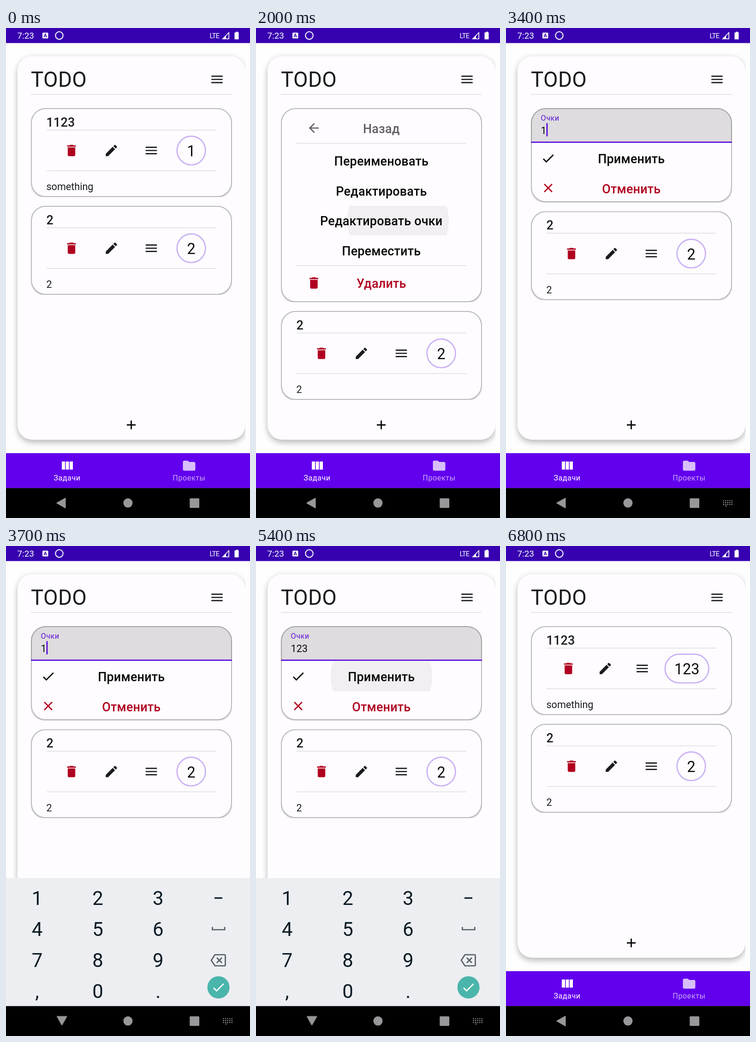
These frames come from a looping animation (529 by 1058 pixels, 6900 ms). An HTML page:

```html
<!DOCTYPE html>
<html lang="ru">
<head>
<meta charset="utf-8">
<title>TODO</title>
<style>
@property --h { syntax: "<length>"; inherits: true; initial-value: 192.2px; }

html, body { margin: 0; width: 100%; height: 100%; overflow: hidden; background: #fefefe; }
#stage { position: absolute; left: 0; top: 0; width: 529px; height: 1058px; overflow: hidden; }
#stage * { animation-play-state: paused !important; }
#stage div, svg { position: absolute; }
svg { left: 0; top: 0; width: 529px; height: 1058px; font-family: Roboto, "Noto Sans", sans-serif; fill: #1b1a1d; }

/* panel */
#sheet { left: 9px; top: 40px; width: 509.5px; height: 878px; overflow: hidden; }
#sheet div {
  left: 16px; top: 21px; width: 493.5px; height: 828px; border-radius: 32px; background: #fefcfe;
  box-shadow: 0 7px 13px rgba(0,0,0,.22), 0 0 14px rgba(0,0,0,.08);
}

/* cards */
#cards {
  left: 54px; top: 173.3px; width: 436px;
  animation: grow .4s 880ms forwards, shrink .4s 2180ms forwards, settle .4s 5700ms forwards;
  animation-timing-function: cubic-bezier(.17,.55,.3,1);
}
.card { width: 436px; height: 192.2px; overflow: hidden; }
.card svg { left: -54px; top: -173.3px; }
.frame {
  box-sizing: border-box; width: 436px; height: 191.4px; border: 2.7px solid #b9b8ba;
  border-radius: 32px; background: #fefcfe; box-shadow: 0 1.5px 2.5px rgba(0,0,0,.22);
}
#first { height: var(--h); }
#first .frame { animation: tall 1ms 880ms forwards, mid 1ms 2580ms forwards, low 1ms 5880ms forwards; }
#second { transform: translateY(calc(var(--h) + 18.8px)); }
@keyframes grow { to { --h: 419.2px; } }
@keyframes shrink { to { --h: 203.7px; } }
@keyframes settle { to { --h: 192.2px; } }
@keyframes tall { to { height: 418.6px; } }
@keyframes mid { to { height: 203px; } }
@keyframes low { to { height: 191.4px; } }

/* panes */
.pane { animation-timing-function: cubic-bezier(.4,0,.2,1); }
#view { animation: to-left .4s 880ms forwards; }
#menu { animation: from-right .4s 880ms both, to-left .4s 2180ms forwards; }
#edit { animation: from-right .4s 2180ms both, to-right .4s 5480ms forwards; }
#done { animation: from-left .4s 5480ms both; }
#view, #menu, #edit, #done { animation-timing-function: cubic-bezier(.4,0,.2,1); }
@keyframes from-right { from { transform: translateX(436px); } }
@keyframes from-left { from { transform: translateX(-436px); } }
@keyframes to-left { to { transform: translateX(-436px); } }
@keyframes to-right { to { transform: translateX(436px); } }

/* touch feedback */
.ripple {
  fill: #000; fill-opacity: .05; visibility: hidden;
  animation: show 1ms var(--at) forwards, spread .3s linear var(--at) both,
    fade .2s calc(var(--at) + 300ms) forwards;
}
@keyframes spread { from { r: calc(var(--r) * .25); } to { r: var(--r); } }
@keyframes fade { to { opacity: 0; } }
@keyframes show { to { visibility: visible; } }
@keyframes hide { to { visibility: hidden; } }

/* points field */
#field { color: #77757a; stroke-width: 1.4px; animation: focus 1ms 3300ms forwards; }
@keyframes focus { to { color: #6013d8; stroke-width: 2.7px; } }
.two, .three, #caret, #ime { visibility: hidden; }
.two { animation: show 1ms 4200ms forwards; }
.three { animation: show 1ms 4500ms forwards; }
#caret {
  animation: show 1ms 3300ms forwards, hide 1ms 3800ms forwards, show 1ms 4200ms forwards,
    hide 1ms 5000ms forwards, show 1ms 5500ms forwards;
}
#caret path { animation: step1 1ms 4200ms forwards, step2 1ms 4500ms forwards; }
@keyframes step1 { to { transform: translateX(12.1px); } }
@keyframes step2 { to { transform: translateX(24.2px); } }

/* keyboard and system bar */
#ime { animation: show 1ms 3300ms forwards, hide 1ms 5800ms forwards; }
#back {
  transform-origin: 120px 1024.5px;
  animation: turn .2s 3500ms forwards, unturn .16s 5800ms forwards;
}
#keys { animation: rise .2s linear 3500ms both, sink .175s linear 5800ms forwards; }
@keyframes turn { to { transform: rotate(-90deg); } }
@keyframes unturn { to { transform: rotate(0deg); } }
@keyframes rise { from { transform: translateY(82px); opacity: 0; } }
@keyframes sink { to { transform: translateY(82px); opacity: 0; } }

/* type and lines */
.h4 { font-size: 45.8px; letter-spacing: .34px; }
.h5 { font-size: 32.3px; text-anchor: middle; }
.h6 { font-size: 26.9px; font-weight: 500; letter-spacing: .2px; }
.body { font-size: 21.55px; }
.cap { font-size: 16.2px; letter-spacing: .54px; }
.mid { text-anchor: middle; }
.key { font-size: 42px; text-anchor: middle; fill: #0a1a24; }
.rule { stroke: #dddcde; stroke-width: 1.5; }
.badge { fill: none; stroke: #cbb0f5; stroke-width: 2.7; }
.red { fill: #b00020; }
.ink { fill: #080808; }
</style>
</head>
<body>
<div id="stage">
  <svg width="0" height="0">
    <defs>
      <g id="bin"><path transform="scale(1.36) translate(-12 -12)" d="M6 19c0 1.1.9 2 2 2h8c1.1 0 2-.9 2-2V7H6v12zM19 4h-3.5l-1-1h-5l-1 1H5v2h14V4z"/></g>
      <g id="pen"><path transform="scale(1.36) translate(-12 -12)" d="M3 17.25V21h3.75L17.81 9.94l-3.75-3.75L3 17.25zM20.71 7.04c.39-.39.39-1.02 0-1.41l-2.34-2.34c-.39-.39-1.02-.39-1.41 0l-1.83 1.83 3.75 3.75 1.83-1.83z"/></g>
      <g id="bars"><path transform="scale(1.36) translate(-12 -12)" d="M3 18h18v-2H3zm0-5h18v-2H3zm0-7v2h18V6z"/></g>
      <g id="arrow"><path transform="scale(1.347) translate(-12 -12)" d="M20 11H7.83l5.59-5.59L12 4l-8 8 8 8 1.41-1.41L7.83 13H20z"/></g>
      <g id="tick"><path transform="scale(1.347) translate(-12 -12)" d="M9 16.17L4.83 12l-1.42 1.41L9 19 21 7l-1.41-1.41z"/></g>
      <g id="cross"><path transform="scale(1.347) translate(-12 -12)" d="M19 6.41L17.59 5 12 10.59 6.41 5 5 6.41 10.59 12 5 17.59 6.41 19 12 13.41 17.59 19 19 17.59 13.41 12z"/></g>
      <path id="rules" class="rule" d="M88 220.5H456M88 308.3H456"/>
      <clipPath id="row3"><path d="M57 384H487V448H57z"/></clipPath>
      <clipPath id="row1"><path d="M57 249H487V314H57z"/></clipPath>
    </defs>
  </svg>

  <div id="sheet"><div></div></div>

  <svg>
    <rect width="529" height="32.5" fill="#3700b0"/>
    <g fill="#fff">
      <text x="24.5" y="23" font-size="18.9">7:23</text>
      <rect x="79" y="10" width="12.5" height="12.5" rx="1.5"/>
      <text x="85.2" y="20.2" font-size="11" font-weight="700" class="mid" fill="#3700b0">A</text>
      <circle cx="115.5" cy="16.2" r="8.2" fill="none" stroke="#fff" stroke-width="2"/>
      <text x="441.5" y="22" font-size="15" letter-spacing="-.9">LTE</text>
      <path d="M470 23.3H483.2V10z" fill="none" stroke="#fff" stroke-width="1.7"/>
      <path d="M469 24L477 16V24z"/>
      <path d="M497.5 9.5H499V8H503V9.5H504.5V24.5H495.5V9.5z"/>
    </g>

    <text x="54" y="127" class="h4">TODO</text>
    <use href="#bars" x="457.5" y="111"/>
    <path class="rule" d="M54 143.5H490"/>
    <path class="ink" d="M262 855.6H270.1V847.5H272.9V855.6H281V858.4H272.9V866.5H270.1V858.4H262z"/>

    <rect y="918" width="529" height="75.5" fill="#6200ee"/>
    <path fill="#fff" d="M121 936H128V953.5H121zM129.5 936H136.5V953.5H129.5zM138 936H145V953.5H138z"/>
    <text x="132.5" y="977" class="cap mid" fill="#fff">Задачи</text>
    <path fill="#d8bffb" transform="translate(397 945) scale(1.347) translate(-12 -12)" d="M10 4H4c-1.1 0-1.99.9-1.99 2L2 18c0 1.1.9 2 2 2h16c1.1 0 2-.9 2-2V8c0-1.1-.9-2-2-2h-8l-2-2z"/>
    <text x="397" y="977" class="cap mid" fill="#cbaaf9">Проекты</text>

    <rect y="993.3" width="529" height="65" fill="#000"/>
    <g fill="#98979a">
      <path id="back" d="M110.5 1025.7L128.5 1015.5V1036z" stroke="#98979a" stroke-width="2" stroke-linejoin="round"/>
      <circle cx="264.4" cy="1025.6" r="10"/>
      <rect x="398.3" y="1015.5" width="20.8" height="20.8" rx="1.8"/>
      <path id="ime" stroke="#98979a" stroke-width="2.2" stroke-dasharray="2.2 2.35" fill="none" d="M470.5 1020.5H491.5M470.5 1024.7H491.5M470.5 1028.9H491.5M476 1032.2h2.2"/>
    </g>
  </svg>

  <div id="cards">
    <div class="card" id="first">
      <div class="frame"></div>
      <svg>
        <g id="view">
          <text x="87.5" y="212.7" class="h6">1123</text>
          <use href="#rules"/>
          <circle class="ripple" style="--at:700ms;--r:32.3px" cx="315" cy="264.5"/>
          <use href="#bin" x="142" y="264.5" class="red"/>
          <use href="#pen" x="228.5" y="264.5"/>
          <use href="#bars" x="315" y="264.5"/>
          <circle class="badge" cx="401.6" cy="264.6" r="30.9"/>
          <text x="401.6" y="277" class="h5 ink">1</text>
          <text x="87.5" y="350" class="body">something</text>
        </g>

        <g id="menu" class="ink">
          <use href="#arrow" x="125.5" y="216" fill="#626064"/>
          <text x="271.8" y="227" class="h6 mid" fill="#626064">Назад</text>
          <path class="rule" d="M88 249H456M88 513.2H456"/>
          <g clip-path="url(#row3)"><circle class="ripple" style="--at:1900ms;--r:220px" cx="308" cy="416"/></g>
          <text x="271.8" y="297" class="h6 mid">Переименовать</text>
          <text x="271.8" y="361.6" class="h6 mid">Редактировать</text>
          <text x="271.8" y="426.3" class="h6 mid">Редактировать очки</text>
          <text x="271.8" y="491" class="h6 mid">Переместить</text>
          <use href="#bin" x="125.5" y="550.5" class="red"/>
          <text x="271.8" y="561" class="h6 mid red">Удалить</text>
        </g>

        <g id="edit" class="ink">
          <g id="field">
            <path d="M54 248V205.3a32 32 0 0 1 32-32H458a32 32 0 0 1 32 32V248z" fill="#000" fill-opacity=".125"/>
            <path d="M54 246.7H490" stroke="currentColor"/>
            <text x="75.5" y="200" class="cap" fill="currentColor">Очки</text>
            <text x="75.5" y="228.5" class="body">1<tspan class="two">2</tspan><tspan class="three">3</tspan></text>
            <g id="caret"><path d="M87.6 205.5h2.7v28.5h-2.7z" fill="#5200d6"/></g>
          </g>
          <g clip-path="url(#row1)"><circle class="ripple" style="--at:5300ms;--r:220px" cx="272" cy="281"/></g>
          <use href="#tick" x="91.5" y="281.5"/>
          <text x="271.8" y="291.7" class="h6 mid">Применить</text>
          <use href="#cross" x="91.5" y="345.5" class="red"/>
          <text x="271.8" y="356.5" class="h6 mid red">Отменить</text>
        </g>

        <g id="done">
          <text x="87.5" y="212.7" class="h6">1123</text>
          <use href="#rules"/>
          <use href="#bin" x="135.3" y="264.5" class="red"/>
          <use href="#pen" x="215.2" y="264.5"/>
          <use href="#bars" x="295.3" y="264.5"/>
          <rect class="badge" x="344.8" y="233.7" width="94.8" height="61.8" rx="30.9"/>
          <text x="392.2" y="277" class="h5 ink">123</text>
          <text x="87.5" y="350" class="body">something</text>
        </g>
      </svg>
    </div>

    <div class="card" id="second">
      <div class="frame"></div>
      <svg>
        <text x="87.5" y="212.7" class="h6">2</text>
        <use href="#rules"/>
        <use href="#bin" x="142" y="264.5" class="red"/>
        <use href="#pen" x="228.5" y="264.5"/>
        <use href="#bars" x="315" y="264.5"/>
        <circle class="badge" cx="401.6" cy="264.6" r="30.9"/>
        <text x="401.6" y="277" class="h5 ink">2</text>
        <text x="87.5" y="350" class="body">2</text>
      </svg>
    </div>
  </div>

  <svg>
    <g id="keys">
      <rect y="717" width="529" height="276.3" fill="#eceef1"/>
      <g class="key">
        <text x="67.5" y="775">1</text><text x="199" y="775">2</text><text x="329.7" y="775">3</text>
        <text x="67.5" y="842">4</text><text x="199" y="842">5</text><text x="329.7" y="842">6</text>
        <text x="67.5" y="909">7</text><text x="199" y="909">8</text><text x="329.7" y="909">9</text>
        <text x="67.5" y="976">,</text><text x="199" y="976">0</text><text x="329.7" y="976">.</text>
      </g>
      <path d="M452 758.5h17v3.2h-17z" fill="#0a1a24"/>
      <g fill="none" stroke="#545e66" stroke-width="2.7">
        <path d="M447.4 822.5V828.5H474.2V822.5"/>
        <path d="M453 882.5H473.5a2 2 0 0 1 2 2V904.5a2 2 0 0 1-2 2H453L445 894.5z" stroke-linejoin="round"/>
        <path d="M457 889L468 900M468 889L457 900"/>
      </g>
      <circle cx="460.6" cy="953" r="24" fill="#4ab5ab"/>
      <use href="#tick" x="460.6" y="953" fill="#fff"/>
    </g>
  </svg>
</div>

<script>
const LOOP = 6900, STEP = 100, LEAD = 20;
const anims = document.getAnimations();
let start;

function tick(now) {
  start ??= now;
  const t = Math.floor((now - start + LEAD) / STEP) * STEP % LOOP;
  for (const a of anims) a.currentTime = t;
  requestAnimationFrame(tick);
}
requestAnimationFrame(tick);
</script>
</body>
</html>
```
